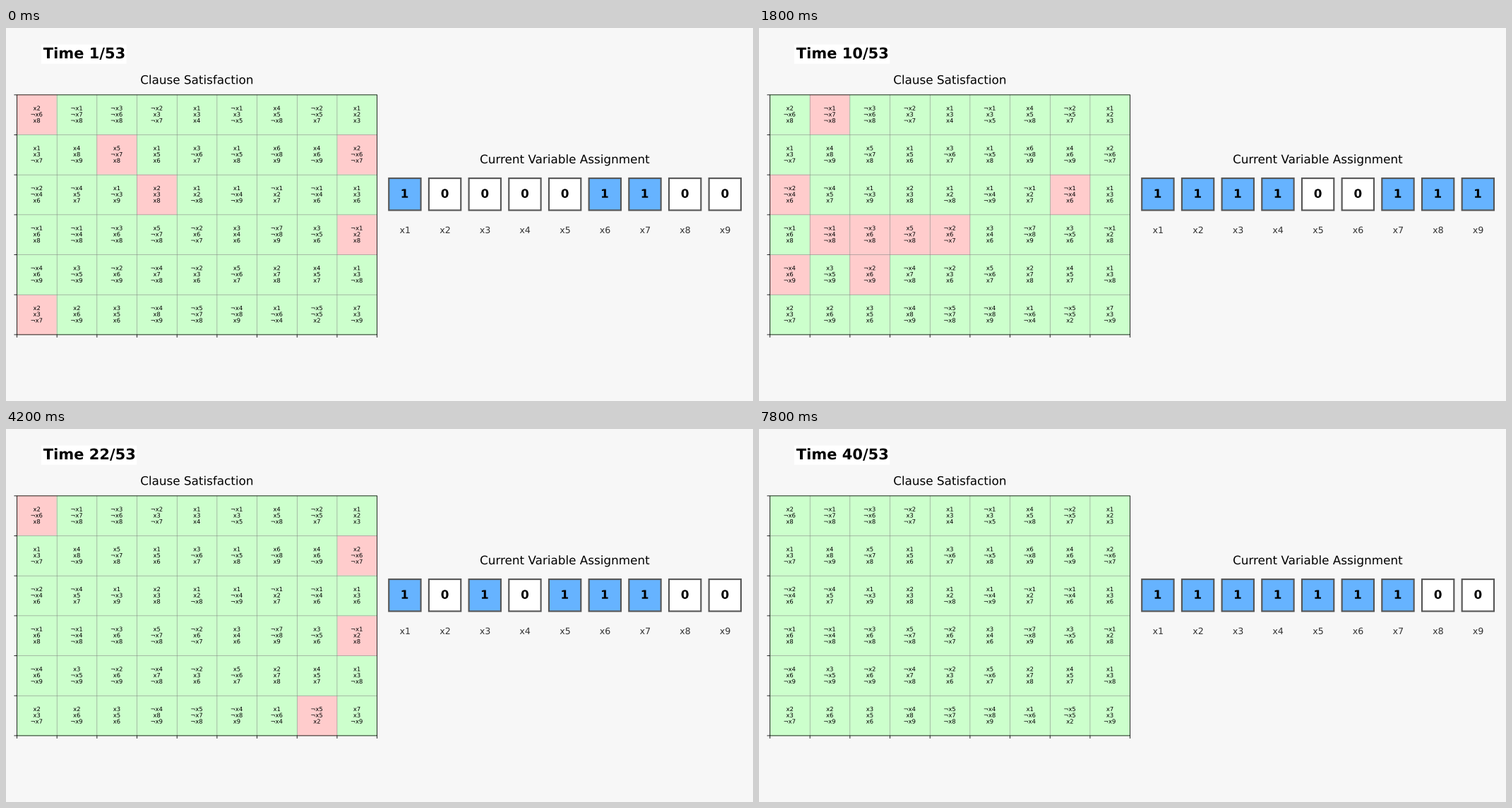
Recreate the animation shown at these times as a matplotlib script. Size 1058 px wide and 529 px high, loop 8000 ms.

```python
import matplotlib.pyplot as plt
from matplotlib.animation import FuncAnimation
from matplotlib.patches import PathPatch, Rectangle
from matplotlib.textpath import TextPath
from matplotlib.transforms import Affine2D

# The layout lives on a 1400 x 700 canvas shown at 1058 x 529 pixels.
W, H = 1400, 700
DPI = 1058 / 14
PX = 100 / 72                       # canvas units per font point
COLS, ROWS, UNIT = 9, 6, 75
LEFT, TOP = 20.5, 125.5             # centre of the grid's outer lines
RIGHT, BOTTOM = LEFT + COLS * UNIT, TOP + ROWS * UNIT
STEPS, TOTAL = 40, 53

GREEN, RED, BLUE = "#ccffcc", "#ffcccc", "#66b3ff"

# One row of clauses per line; "-" marks a negated variable.
CLAUSES = """
2-68 -1-7-8 -3-6-8 -23-7 134 -13-5 45-8 -2-57 123
13-7 48-9 5-78 156 3-67 1-58 6-89 46-9 2-6-7
-2-46 -457 1-39 238 12-8 1-4-9 -127 -1-46 136
-168 -1-4-8 -36-8 5-7-8 -26-7 346 -7-89 3-56 -128
-46-9 3-5-9 -26-9 -47-8 -236 5-67 278 457 13-8
23-7 26-9 356 -48-9 -5-7-8 -4-89 1-6-4 -5-52 73-9
"""
START = [1, 0, 0, 0, 0, 1, 1, 0, 0]
# step -> variable flipped at that step
FLIPS = {2: 4, 3: 6, 5: 3, 6: 2, 7: 9, 9: 8, 11: 6, 13: 4, 14: 2, 16: 9,
         18: 8, 20: 5, 22: 5, 24: 2, 27: 4, 38: 5}


def parse(word):
    lits, sign = [], 1
    for ch in word:
        if ch == "-":
            sign = -1
        else:
            lits.append(sign * int(ch))
            sign = 1
    return lits


def assignment(step):
    values = list(START)
    for when, var in FLIPS.items():
        if when <= step:
            values[var - 1] ^= 1
    return values


def satisfied(clause, values):
    return any(values[abs(lit) - 1] == (lit > 0) for lit in clause)


fig = plt.figure(figsize=(14, 7), dpi=DPI, facecolor="#f7f7f7")
ax = fig.add_axes([0, 0, 1, 1])
ax.set_xlim(0, W)
ax.set_ylim(H, 0)
ax.axis("off")


def glyphs(x, y, text, size, weight="normal", align=0.5):
    """Outline of a text; align 0 puts its left edge at x, 0.5 its middle."""
    path = TextPath((0, 0), text, size=size * PX,
                    prop={"family": "DejaVu Sans", "weight": weight})
    ext = path.get_extents()
    shift = x - ext.x0 - align * ext.width
    return Affine2D().scale(1, -1).translate(shift, y).transform_path(path)


def label(x, y, text, size, color="black", **kw):
    return ax.add_patch(PathPatch(glyphs(x, y, text, size, **kw), lw=0,
                                  fc=color, zorder=4, snap=False))


def line(xs, ys, width, color, z):
    ax.plot(xs, ys, color=color, lw=width, zorder=z, snap=False,
            solid_capstyle="butt")


def box(x, y, w, h, z=1, **kw):
    return ax.add_patch(Rectangle((x, y), w, h, zorder=z, snap=False, **kw))


# Clause grid: the fill spans 676 x 451 whole units, split evenly
def edge_x(col):
    return 20 + round(676 / COLS * col)


def edge_y(row):
    return 125 + round(451 / ROWS * row)


box(20, 125, 676, 451, z=0, lw=0, fc=GREEN)
clauses = [parse(word) for word in CLAUSES.split()]
cells = []
for i, clause in enumerate(clauses):
    row, col = divmod(i, COLS)
    x, y = edge_x(col), edge_y(row)
    cells.append(box(x, y, edge_x(col + 1) - x, edge_y(row + 1) - y, lw=0))
    for k, lit in enumerate(clause):
        name = ("¬" if lit < 0 else "") + f"x{abs(lit)}"
        label(57.4 + col * UNIT, 166 + row * UNIT + (k - 1) * 11.6, name, 8)

tick = 3.5 * PX
for c in range(COLS + 1):
    x = LEFT + c * UNIT
    line([x, x], [BOTTOM, BOTTOM + 0.5 + tick], 0.8, "black", 3)
    if 0 < c < COLS:
        line([x, x], [TOP, BOTTOM], 0.5, "gray", 2)
for r in range(ROWS + 1):
    y = TOP + r * UNIT
    line([LEFT - 0.5 - tick, LEFT], [y, y], 0.8, "black", 3)
    if 0 < r < ROWS:
        line([LEFT, RIGHT], [y, y], 0.5, "gray", 2)
box(LEFT, TOP, RIGHT - LEFT, BOTTOM - TOP, z=3, fill=False, ec="black",
    lw=0.8)

# Variable row
centers = [747.5 + v * UNIT for v in range(COLS)]
squares = [box(cx - 30, 282, 60, 60, ec="#555555", lw=2) for cx in centers]


def bit_path(cx, value):
    return glyphs(cx, 318.5, str(value), 16, weight="bold")


bits = []
for v, cx in enumerate(centers):
    bits.append(ax.add_patch(PathPatch(bit_path(cx, 0), lw=0, fc="black",
                                       zorder=4, snap=False)))
    label(cx, 385, f"x{v + 1}", 12, color="#333333")

label(357.4, 105, "Clause Satisfaction", 16)
label(1047.5, 254, "Current Variable Assignment", 16)

# Clock on a white plate
PAD = 3 * PX
plate = box(70 - PAD, 30.8, 0, 36.4, lw=0, fc="white")
clock = label(70, 57, "Time", 20, weight="bold", align=0)


def draw(step):
    values = assignment(step)
    for cell, clause in zip(cells, clauses):
        cell.set_facecolor(GREEN if satisfied(clause, values) else RED)
    for cx, square, bit, value in zip(centers, squares, bits, values):
        square.set_facecolor(BLUE if value else "white")
        bit.set_path(bit_path(cx, value))
    path = glyphs(70, 57, f"Time {step + 1}/{TOTAL}", 20, "bold", 0)
    clock.set_path(path)
    plate.set_width(path.get_extents().width + 2 * PAD)
    return [*cells, *squares, *bits, plate, clock]


anim = FuncAnimation(fig, draw, frames=STEPS, interval=200, repeat=True,
                     repeat_delay=0, blit=False)
plt.show()
```
